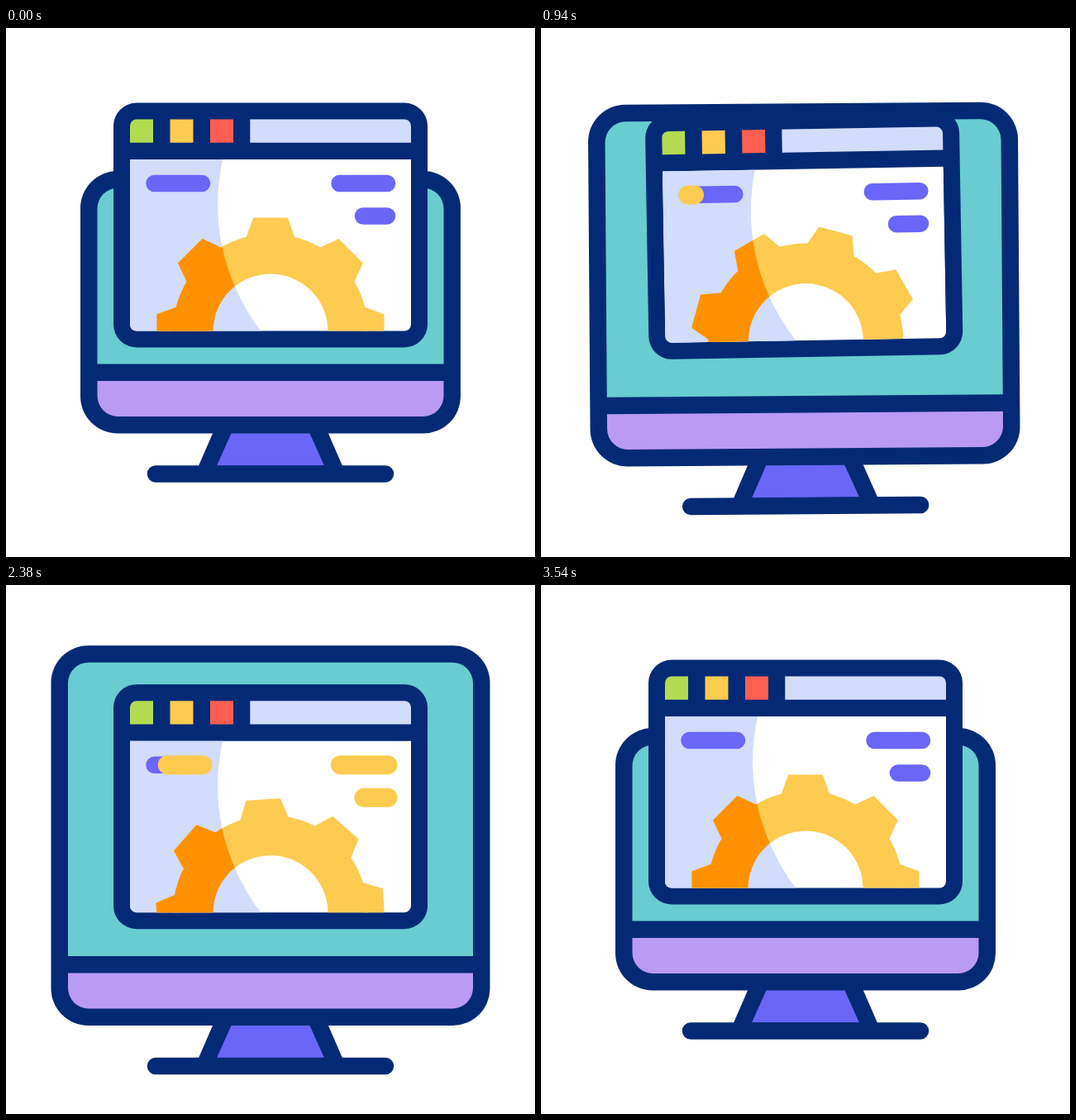
Recreate the animation shown at these times as an HTML page with a canvas. Size 640 by 640 pixels, loop 3.6 s.

```html
<!DOCTYPE html>
<html lang="en">
<head>
<meta charset="utf-8">
<title>Desktop settings</title>
<style>
html, body { margin: 0; width: 100%; height: 100%; overflow: hidden; background: #fff; }
canvas { display: block; width: 640px; height: 640px; }
</style>
</head>
<body>
<canvas id="stage" width="640" height="640"></canvas>
<script>
const ctx = document.getElementById('stage').getContext('2d');
const LOOP = 3600;
const NAVY = '#042a75', TEAL = '#68ccd1', LILAC = '#ba9af2', VIOLET = '#6a66f8',
      SKY = '#d2dcfd', YELLOW = '#fdcb50', ORANGE = '#ff9100', GREEN = '#b2db52', RED = '#ff5f50';

const clamp = u => Math.min(1, Math.max(0, u));

// Smooth step from 0 to 1 between two times.
function ease(t, start, end) {
  const u = clamp((t - start) / (end - start));
  return u * u * (3 - 2 * u);
}

// Half a turn that speeds up evenly and brakes late.
function gearAngle(t) {
  const u = clamp((t - 220) / 2945);
  return 180 * (1.5 * u ** 2 - 0.5 * u ** 6);
}

function box(color, x, y, w, h, r = 0) {
  ctx.fillStyle = color;
  ctx.beginPath();
  ctx.roundRect(x, y, w, h, r);
  ctx.fill();
}

function poly(color, ...points) {
  ctx.fillStyle = color;
  ctx.beginPath();
  points.forEach(p => ctx.lineTo(...p));
  ctx.fill();
}

// Trapezoid standing on its wide or narrow end, centred on x = 320.
function taper(color, y0, half0, y1, half1) {
  poly(color, [320 - half0, y0], [320 + half0, y0], [320 + half1, y1], [320 - half1, y1]);
}

function dash(color, width, x0, y0, x1, y1) {
  ctx.strokeStyle = color;
  ctx.lineWidth = width;
  ctx.lineCap = 'round';
  ctx.beginPath();
  ctx.moveTo(x0, y0);
  ctx.lineTo(x1, y1);
  ctx.stroke();
}

function turn(degrees, x, y) {
  ctx.translate(x, y);
  ctx.rotate(degrees * Math.PI / 180);
  ctx.translate(-x, -y);
}

function group(draw) {
  ctx.save();
  draw();
  ctx.restore();
}

function drawRay(t, x, y, dx, dy) {
  const head = 29 * ease(t, 2960, 3400), tail = 29 * ease(t, 3200, 3530);
  if (head - tail > 0.1)
    dash(YELLOW, 20.5, x + dx * tail, y + dy * tail, x + dx * head, y + dy * head);
}

function drawMonitor(size) {
  const w = 460 + 71 * size, h = 317.5 + 142.3 * size;
  const x = 320 - w / 2, y = 490.5 - h;
  box(NAVY, x, y, w, h, 45);
  box(TEAL, x + 20.5, y + 20.5, w - 41, h - 104.5, [25, 25, 0, 0]);
  box(LILAC, x + 20.5, 427, w - 41, 43, [0, 0, 25, 25]);
  taper(NAVY, 486, 68, 532, 88);
  taper(VIOLET, 490.5, 47.5, 529.5, 65);
  dash(NAVY, 20.5, 181, 539.5, 459, 539.5);
}

function drawGear(color, angle) {
  const cx = 320, cy = 367;
  group(() => {
    turn(angle, cx, cy);
    ctx.fillStyle = color;
    ctx.beginPath();
    ctx.arc(cx, cy, 118, 0, 7);
    ctx.arc(cx, cy, 69.5, 7, 0, true);
    ctx.fill();
    for (let i = 0; i < 8; i++) {
      turn(45, cx, cy);
      taper(color, 229.5, 20.8, 255, 30);
    }
  });
}

function shadePath() {
  ctx.beginPath();
  ctx.moveTo(150, 159);
  ctx.lineTo(262, 159);
  ctx.bezierCurveTo(247, 228, 260, 302, 308.5, 367);
  ctx.lineTo(150, 367);
  ctx.closePath();
}

// Text bar; a yellow fill sweeps in, then out, later for each bar.
function drawPill(t, i, x, y, length) {
  const enter = 854 + 290 * i, leave = 2255 + 200 * i;
  const head = length * ease(t, enter, enter + 380);
  const tail = length * ease(t, leave, leave + 380);
  dash(VIOLET, 20.5, x, y, x + length, y);
  if (head - tail > 0.1) dash(YELLOW, 23, x + 1 + tail, y, x + 1 + head, y);
}

function drawWindow(t) {
  const angle = gearAngle(t);
  box(NAVY, 130, 90.5, 380, 296, 28);
  ctx.beginPath();
  ctx.roundRect(150, 110.5, 340, 256, 8);
  ctx.clip();
  [GREEN, YELLOW, RED].forEach((color, i) => box(color, 150 + 48.5 * i, 110, 28, 28.7));
  box(SKY, 295.3, 110, 195, 28.7);
  box('#fff', 150, 159, 340, 208);
  shadePath();
  ctx.fillStyle = SKY;
  ctx.fill();
  drawGear(YELLOW, angle);
  group(() => {
    shadePath();
    ctx.clip();
    drawGear(ORANGE, angle);
  });
  drawPill(t, 0, 179.5, 188, 57.5);
  drawPill(t, 1, 403.5, 188, 57.5);
  drawPill(t, 2, 432, 227.5, 29);
}

function frame() {
  const t = performance.now() % LOOP;
  const step = (start, end) => ease(t, start, end);

  const size = step(220, 1180) - step(3045, 3500);
  const drop = 42.5 * (step(220, 1110) - step(3060, 3520));
  const tilt = -2 * step(220, 720) + 3.85 * step(720, 1220) - 1.85 * step(1220, 1720);
  const lift = -50 * step(220, 540) + 79.7 * step(540, 1120) - 29.7 * step(2990, 3490);
  const sway = -1.56 * step(220, 720) + 2.66 * step(720, 1450) - 1.1 * step(1450, 2300);

  box('#fff', 0, 0, 640, 640);
  drawRay(t, 536.5, 63.8, 0.2, -0.98);
  drawRay(t, 567.3, 95.7, 0.91, -0.85);
  drawRay(t, 593.5, 132.3, 1, 0);
  group(() => {
    ctx.translate(0, drop);
    turn(tilt, 320, 512);
    drawMonitor(size);
  });
  group(() => {
    ctx.translate(0, lift);
    turn(sway, 320, 344);
    drawWindow(t);
  });
  requestAnimationFrame(frame);
}
frame();
</script>
</body>
</html>
```
